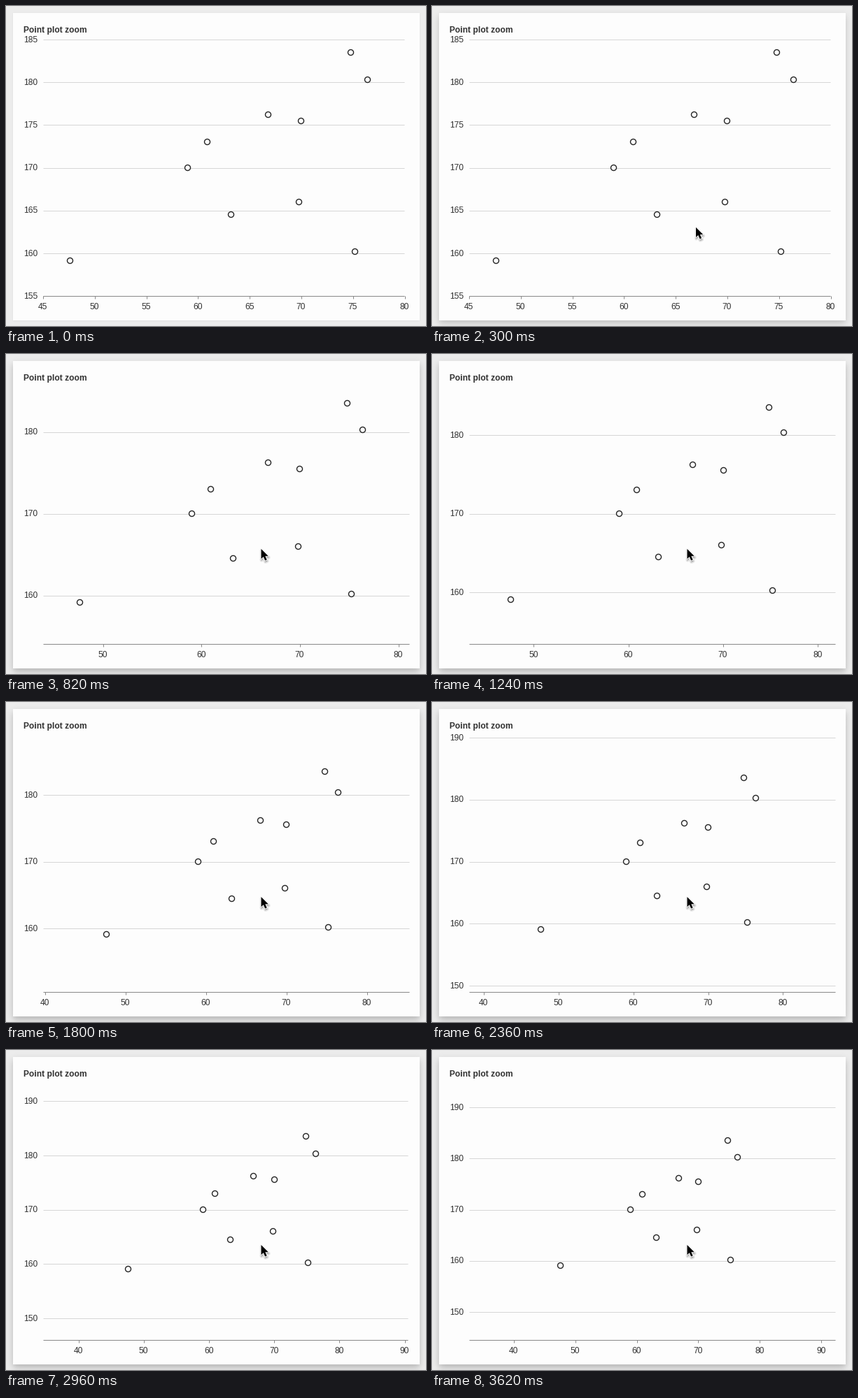
Recreate the animation shown at these times as a matplotlib script. Size 600 by 458 pixels, loop 3.82 s.

```python
import math

import numpy as np
import matplotlib.pyplot as plt
from matplotlib.animation import FuncAnimation
from matplotlib.collections import LineCollection
from matplotlib.patches import Polygon

W, H, DPI = 600, 458, 100
STEP, LOOP = 20, 3820
PX = 72 / DPI

INK, DOT, GRID, AXIS = "#303030", "#262626", "#d6d6d6", "#888888"
CARD, PAGE = "#fdfdfd", np.full(3, 237 / 255)
LEFT, RIGHT, TOP, BOTTOM = 52.5, 575.5, 41.5, 414.5

POINTS = np.array([
    (47.6, 159.1), (59, 170), (60.9, 173), (63.2, 164.5), (66.8, 176.2),
    (69.8, 166), (70, 175.5), (74.8, 183.5), (75.2, 160.2), (76.4, 180.3),
])

# start ms, end ms, number of visible steps, zoom gained
ZOOMS = [
    (560, 840, 7, 0.1), (1240, 1280, 3, 0.1), (1420, 1800, 7, 0.1),
    (2260, 2360, 2, 0.1), (2800, 2960, 5, 0.2), (3500, 3620, 3, 0.1),
]

ARROW = 1.06 * np.array([(0, 0), (0, 13.4), (3.1, 10.6), (5.3, 15.6),
                         (7.7, 14.6), (5.5, 9.7), (9.7, 9.7)])
REST, ENTRY = np.array([364.5, 279]), np.array([425, 462])


def progress(t, start, end, steps):
    if t < start:
        return 0.0
    u = min(1, (t - start) / (end - start))
    return (1 + math.floor(u * (steps - 1) + 1e-6)) / steps


def zoom_at(t):
    return 1 + sum(gain * progress(t, a, b, n) ** 3 for a, b, n, gain in ZOOMS)


def ticks(lo, hi, step):
    first = math.ceil(lo / step - 1e-6) * step
    return np.arange(first, hi + 1e-6, step)


def soft_box(sigma, drop):
    """Blurred silhouette of the card, moved down by drop."""
    def band(v, lo, hi):
        k = 1.7 / sigma
        return 0.5 * (np.tanh(k * (v - lo) / 2) - np.tanh(k * (v - hi) / 2))
    x, y = np.arange(W) + 0.5, np.arange(H) + 0.5
    return np.outer(band(y, 10 + drop, 450 + drop), band(x, 10, 591))


FLAT, RAISED = soft_box(1.2, 0.5), soft_box(5, 4.5)


def backdrop(hover):
    shade = 0.08 * (1 - hover) * FLAT + 0.24 * hover * RAISED
    return PAGE * (1 - shade[..., None])


fig = plt.figure(figsize=(W / DPI, H / DPI), dpi=DPI)
ax = fig.add_axes([0, 0, 1, 1])
ax.axis("off")

page = ax.imshow(backdrop(0), extent=(0, W, H, 0), interpolation="nearest",
                 aspect="auto", zorder=0)
ax.set_xlim(0, W)
ax.set_ylim(H, 0)
ax.add_patch(plt.Rectangle((10, 10), 581, 440, fc=CARD, lw=0, zorder=1))

grid = LineCollection([], colors=GRID, linewidths=PX, zorder=2)
axis = LineCollection([], colors=AXIS, linewidths=PX, zorder=3)
ax.add_collection(grid)
ax.add_collection(axis)
dots = ax.scatter([], [], s=(8 * PX) ** 2, facecolors=CARD, edgecolors=DOT,
                  linewidths=1.4 * PX, zorder=4)


def label(ha, **kw):
    return ax.text(0, 0, "", ha=ha, va="baseline", color=INK, zorder=5,
                   family="Liberation Sans", size=12 * PX, **kw)


title = label("left", weight="bold")
title.set_position((24.7, 38))
title.set_text("Point plot zoom")
x_labels = [label("center") for _ in range(9)]
y_labels = [label("right") for _ in range(9)]


def arrow(offset=(0, 0), **kw):
    shape = Polygon(ARROW, zorder=6, **kw)
    ax.add_patch(shape)
    return shape, np.array(offset)


cursor = [arrow((0.5, 2), fc="black", ec="black", alpha=0.08, lw=w * PX,
                joinstyle="round") for w in (1, 3, 5)]
cursor += [arrow(fc="white", ec="white", lw=2 * PX),
           arrow(fc="black", lw=0)]


def set_labels(pool, values, places):
    for i, text in enumerate(pool):
        shown = i < len(values)
        text.set_visible(shown)
        if shown:
            text.set_text(f"{values[i]:.0f}")
            text.set_position(places[i])


def draw_chart(zoom):
    step = 5 if zoom < 1.05 else 10
    x0, x1 = 62.5 - 17.5 * zoom, 62.5 + 17.5 * zoom
    y0, y1 = 170 - 15 * zoom, 170 + 15 * zoom
    xt, yt = ticks(x0, x1, step), ticks(y0, y1, step)

    # shrink the plot where the last label would stick out
    right = min(RIGHT, LEFT + 516.5 * (x1 - x0) / (xt[-1] - x0))
    top = max(TOP, BOTTOM - 367 * (y1 - y0) / (yt[-1] - y0))

    def sx(v):
        return LEFT + (v - x0) / (x1 - x0) * (right - LEFT)

    def sy(v):
        return BOTTOM - (v - y0) / (y1 - y0) * (BOTTOM - top)

    def crisp(v):
        return math.floor(v + 0.05) + 0.5

    rows = [crisp(sy(v)) for v in yt]
    cols = [crisp(sx(v)) for v in xt]
    grid.set_segments([[(LEFT, y), (right, y)] for y in rows])
    axis.set_segments([[(LEFT, BOTTOM), (right, BOTTOM)]]
                      + [[(x, BOTTOM), (x, BOTTOM + 4)] for x in cols])
    set_labels(x_labels, xt, [(sx(v), 434) for v in xt])
    set_labels(y_labels, yt, [(45.3, round(sy(v) + 4.3)) for v in yt])
    dots.set_offsets(np.column_stack([sx(POINTS[:, 0]), sy(POINTS[:, 1])]))


def draw(i):
    t = i * STEP
    draw_chart(zoom_at(t))

    hover = min(1, max(0, (t - 80) / 600))
    page.set_data(backdrop(1 - (1 - hover) ** 3))

    move = progress(t, 20, 540, 11)
    tip = ENTRY + (REST - ENTRY) * (1 - (1 - move) ** 2)
    for shape, offset in cursor:
        shape.set_xy(ARROW + tip + offset)
        shape.set_visible(move > 0)
    return []


anim = FuncAnimation(fig, draw, frames=LOOP // STEP, interval=STEP,
                     init_func=lambda: draw(0), repeat=True, repeat_delay=0)
plt.show()
```
